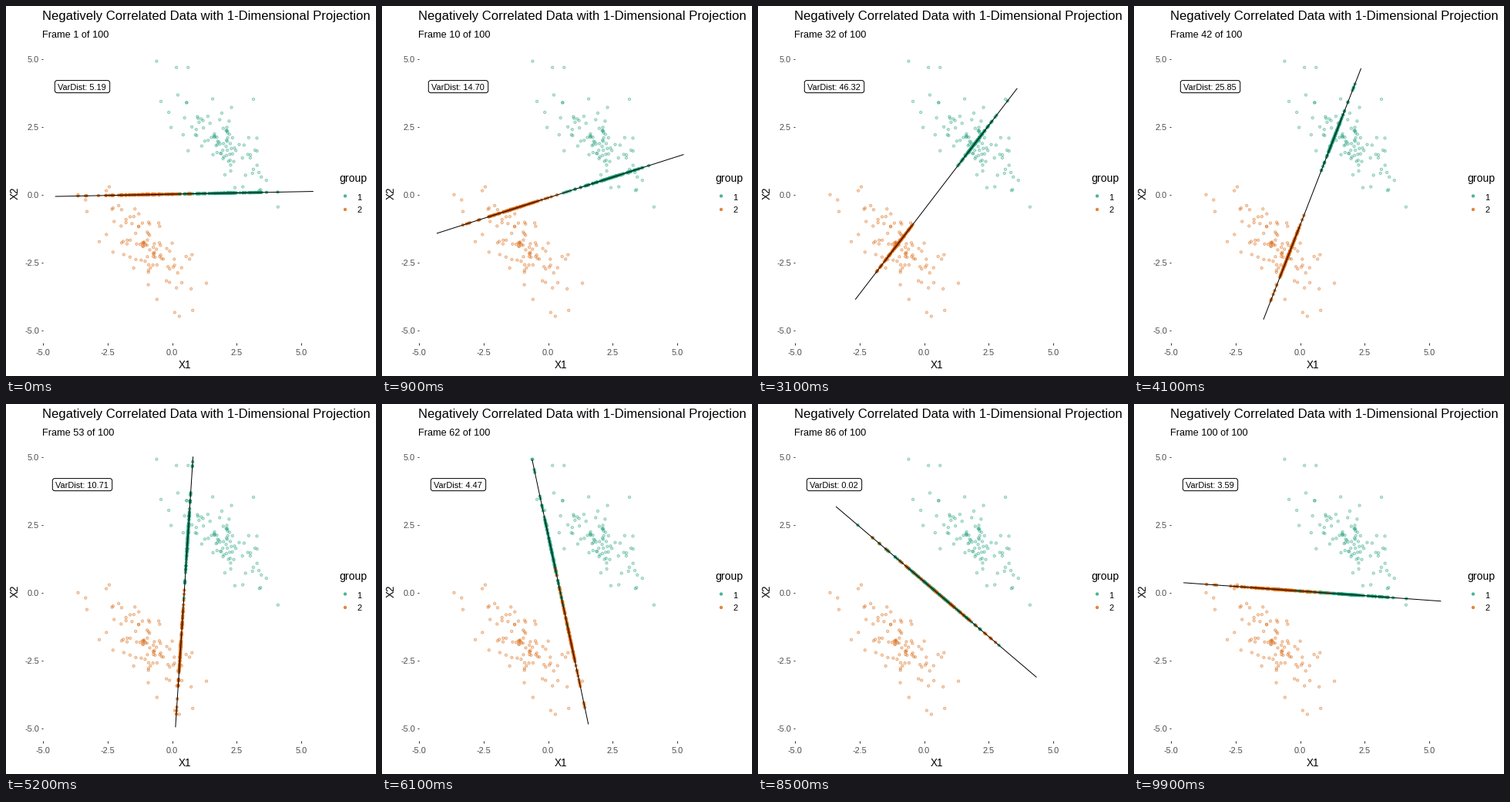
A matplotlib script for the animation above (10 s loop, 480 px wide and 480 px high).

```python
import numpy as np
import matplotlib.pyplot as plt
from matplotlib.animation import FuncAnimation
from matplotlib.colors import to_rgba
from matplotlib.patches import FancyBboxPatch

SIZE, DPI, FRAMES = 480, 100, 100
PX = 72 / DPI
GREEN, ORANGE = "#1b9e77", "#d95f02"
ORIGIN = np.array([215.5, 245.2])
UNIT = np.array([33.5, -35.2])

# Shared shape of both groups and the vector between their means.
CENTER = np.array([0.47, 0.04])
GAP = np.array([2.9, 3.93])
COV = 0.875 * np.array([[1, -0.725], [-0.725, 1.0035]])

# A few points that mark the rim of each group.
UPPER_RIM = [(-0.6, 4.93), (0.17, 4.7), (0.62, 4.7), (-0.43, 3.45),
             (-0.04, 2.49), (3.15, 3.53), (2.43, 0.27), (4.1, -0.44)]
LOWER_RIM = [(-2.55, 0.16), (-3.35, -0.18), (-3.3, -0.61), (-2.82, -1.72),
             (0.77, -2.2), (1.33, -3.25), (0.1, -4.33), (0.28, -4.47)]

# Projection direction in degrees at a few steps of the sweep.
KEY_STEPS = [0, 17, 31, 52, 71, 85, 99]
KEY_ANGLES = [1.06, 31.0, 51.15, 86.1, 120.9, 141.0, 176.1]


def to_px(p):
    return ORIGIN + p * UNIT


def group(rim, mean, rng, n=100):
    """Fill up the rim so that the whole group has the given mean and COV."""
    rim = np.array(rim)
    m = n - len(rim)
    core_mean = (n * mean - rim.sum(0)) / m
    moment = n * (COV + np.outer(mean, mean)) - rim.T @ rim
    core_cov = moment / m - np.outer(core_mean, core_mean)

    z = rng.standard_normal((m, 2))
    z -= z.mean(0)
    z = z @ np.linalg.inv(np.linalg.cholesky(z.T @ z / m)).T
    return np.vstack([rim, core_mean + z @ np.linalg.cholesky(core_cov).T])


rng = np.random.default_rng(7)
upper = group(UPPER_RIM, CENTER + GAP / 2, rng)
lower = group(LOWER_RIM, CENTER - GAP / 2, rng)
order = rng.permutation(200)
data = np.vstack([upper, lower])[order]
colors = np.repeat([GREEN, ORANGE], 100)[order]

plt.rcParams["font.family"] = "Liberation Sans"
fig = plt.figure(figsize=(SIZE / DPI, SIZE / DPI), dpi=DPI, facecolor="white")
ax = fig.add_axes([0, 0, 1, 1])
ax.set(xlim=(0, SIZE), ylim=(SIZE, 0))
ax.axis("off")


def text(x, y, s, px, color="black", **kw):
    return ax.text(x, y, s, fontsize=px * PX, color=color, **kw)


def dots(p, cols, fill, edge, z):
    return ax.scatter(p[:, 0], p[:, 1], s=(3.3 * PX) ** 2,
                      facecolors=[to_rgba(c, fill) for c in cols],
                      edgecolors=[to_rgba(c, edge) for c in cols],
                      linewidths=PX, zorder=z)


def tick(xs, ys):
    ax.plot(xs, ys, color="#333333", lw=PX, solid_capstyle="butt")


text(47, 18, "Negatively Correlated Data with 1-Dimensional Projection", 16.6)
subtitle = text(47, 41, "", 12.8)
text(231.5, 470, "X1", 13.5, ha="center")
text(12, 243, "X2", 13.5, ha="center", va="center", rotation=90)

for v in (-5, -2.5, 0, 2.5, 5):
    x, y = to_px(np.array([v, v]))
    text(x, 453, f"{v:.1f}", 11, "#4d4d4d", ha="center")
    text(43, y + 4, f"{v:.1f}", 11, "#4d4d4d", ha="right")
    tick([x, x], [437, 439.5])
    tick([45.5, 48], [y, y])

text(432, 228, "group", 14)
dots(np.array([(440, 246.5), (440, 264)]), [GREEN, ORANGE], 0.7, 0.7, 2)
text(458.5, 251.5, "1", 11, ha="center")
text(459, 268.5, "2", 11, ha="center")

dots(to_px(data), colors, 0.22, 0.42, 2)
shadow = dots(to_px(data), colors, 0.6, 0.7, 3)
axis_line, = ax.plot([], [], color="black", lw=PX, solid_capstyle="butt",
                     zorder=4)
box = FancyBboxPatch((63, 97), 71, 16, boxstyle="round,pad=0,rounding_size=3",
                     fc="white", ec="black", lw=PX, zorder=5)
ax.add_patch(box)
label = text(98, 109.3, "", 11, ha="center", zorder=6)


def update(i):
    a = np.radians(np.interp(i, KEY_STEPS, KEY_ANGLES))
    u = np.array([np.cos(a), np.sin(a)])
    reach = (data - CENTER) @ u
    shadow.set_offsets(to_px(CENTER + np.outer(reach, u)))
    axis_line.set_data(*to_px(CENTER + np.outer([-5, 5], u)).T)

    # Squared gap of the projected means over their summed variances.
    value = (GAP @ u) ** 2 / (2 * u @ COV @ u)
    width = 71.3 + 6.1 * (value >= 10)
    box.set_bounds(99 - width / 2, 96.6, width, 16)
    label.set_text(f"VarDist: {value:.2f}")
    subtitle.set_text(f"Frame {i + 1} of {FRAMES}")
    return shadow, axis_line, box, label, subtitle


anim = FuncAnimation(fig, update, frames=FRAMES, interval=100, repeat=True,
                     repeat_delay=0, blit=False)
plt.show()
```
